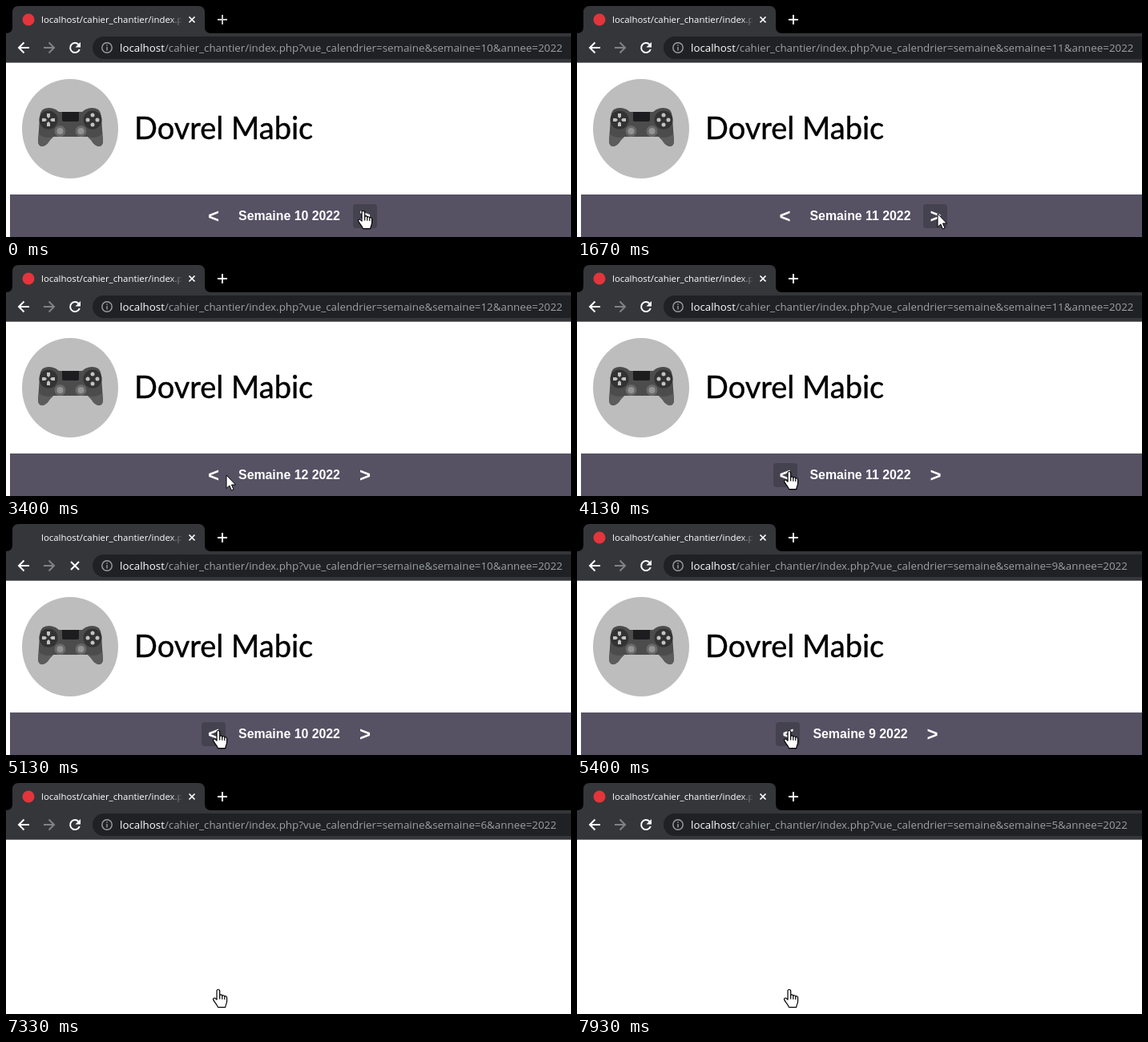
Animation of 705x288 px, one loop 8000 ms. Source, as an HTML page:

```html
<!DOCTYPE html>
<html lang="fr">
<head>
<meta charset="utf-8">
<title>Agenda</title>
<style>
  html, body { margin: 0; width: 100%; height: 100%; overflow: hidden; background: #fff; }
  #stage { position: relative; width: 705px; height: 288px; overflow: hidden; background: #fff; }
  svg { position: absolute; left: 0; top: 0; }
  .ui { font-family: "Open Sans", "Noto Sans", sans-serif; }
  .name { font: 38px Lato, sans-serif; stroke: #000; stroke-width: .4; stroke-linejoin: round; }
  #bar { position: absolute; left: 5px; top: 235px; width: 700px; height: 53px; background: #565264; }
  #nav {
    position: absolute; left: 0; top: 12px; width: 697px; height: 30px;
    display: flex; justify-content: center; gap: 16px;
    color: #fff; font: bold 15.85px/30px "Liberation Sans", Arial, sans-serif; white-space: nowrap;
  }
  #nav b { width: 30px; border-radius: 4px; text-align: center; font-size: 24px; }
  #nav b.on { background: #45424f; }
</style>
</head>
<body>
<div id="stage">
  <div id="page">
    <svg width="705" height="288">
      <ellipse cx="80" cy="153" rx="60" ry="62" fill="#bdbdbd"/>
      <path d="M46 129Q53 125 62 129L66 132H95L99 129Q108 125 115 129Q118 131 119 139L121 168Q121 175 116 175Q111 175 106 167L102 163H59L55 167Q50 175 45 175Q40 175 40 168L42 139Q43 131 46 129Z" fill="#4c4c4c"/>
      <path d="M41 160L40 168Q40 175 45 175Q50 175 55 167L59 163Q49 166 41 160ZM120 160L121 168Q121 175 116 175Q111 175 106 167L102 163Q112 166 120 160Z" fill="#5c5c5c"/>
      <path d="M70 132H91V142Q91 144 89 144H72Q70 144 70 142Z" fill="#1d1d1f"/>
      <g fill="#333"><circle cx="53" cy="142" r="11.5"/><circle cx="108" cy="142" r="11.5"/></g>
      <g fill="#c2c2c2">
        <path d="M51 134h4v4l-2 2-2-2zM51 150h4v-4l-2-2-2 2zM45 140v4h4l2-2-2-2zM61 140v4h-4l-2-2 2-2z"/>
        <circle cx="108" cy="136" r="2.5"/><circle cx="108" cy="148" r="2.5"/>
        <circle cx="102" cy="142" r="2.5"/><circle cx="114" cy="142" r="2.5"/>
      </g>
      <g fill="#939393" stroke="#696969" stroke-width="3">
        <circle cx="67.5" cy="156" r="5.5"/><circle cx="93.5" cy="156" r="5.5"/>
      </g>
      <text class="name" x="160" y="166">Dovrel Mabic</text>
    </svg>
    <div id="bar"><div id="nav"><b id="prev">&lt;</b><span id="week"></span><b id="next">&gt;</b></div></div>
  </div>

  <svg class="ui" width="705" height="288">
    <defs>
      <linearGradient id="fade">
        <stop offset="0" stop-color="#35363a" stop-opacity="0"/>
        <stop offset="1" stop-color="#35363a"/>
      </linearGradient>
      <clipPath id="tab"><rect x="40" width="179" height="34"/></clipPath>
    </defs>
    <rect width="705" height="34"/>
    <path d="M0 34Q8 34 8 26V8Q8 0 16 0H240Q248 0 248 8V26Q248 34 256 34H705V70H0Z" fill="#35363a"/>
    <rect y="70" width="705" height="1" fill="#747578"/>
    <rect x="108" y="38" width="640" height="28" rx="14" fill="#202124"/>
    <circle id="icon" cx="28" cy="17" r="7.5" fill="#e3353b"/>
    <text x="44" y="21" font-size="11.4" fill="#fff" clip-path="url(#tab)">localhost/cahier_chantier/index.php</text>
    <rect x="205" y="4" width="15" height="26" fill="url(#fade)"/>
    <g fill="none" stroke="#fff" stroke-width="2">
      <path d="M228.5 13.5l7 7m0-7l-7 7" stroke-width="1.7"/>
      <path id="plus" d="M264 17h12M270 11v12"/>
      <path d="M29 52H16.5M22.500 45.5L16 52l6.5 6.5"/>
      <path d="M47 52H59.5M53.500 45.5L60 52l-6.5 6.5" stroke="#808286"/>
      <g id="reload">
        <path d="M90.5 48A6 6 0 1 0 91.8 54"/>
        <path d="M93 45v6.5H86.5Z" fill="#fff" stroke="none"/>
      </g>
      <path id="stop" d="M81 47l10 10m0-10l-10 10"/>
      <g stroke="#9aa0a6" stroke-width="1.4">
        <circle cx="126" cy="52" r="6.2"/><path d="M126 51v4.5M126 48.3v1.5"/>
      </g>
    </g>
    <text x="142" y="57" font-size="13.35" fill="#9aa0a6"><tspan fill="#fff">localhost</tspan><tspan id="path"></tspan></text>

    <g id="cursor" stroke="#000" stroke-linejoin="round" fill="#fff">
      <g id="hand" stroke-width="1.2">
        <path d="M-2 13V2.3C-2-.1 1.7-.1 1.7 2.3V8C1.7 6.4 4.8 6.5 4.8 8.7C4.8 7.2 7.8 7.4 7.8 9.5C7.8 8.2 10.6 8.4 10.6 10.7V15C10.6 18 9 19 8.7 22.7H-.5C-1 20-4 17.5-6.3 13.4C-7.2 11.3-4.8 10.3-3.5 11.7Z"/>
        <path d="M1.7 8v4.5M4.8 8.7v4M7.8 9.5v3.5" fill="none"/>
      </g>
      <path id="arrow" d="M0 0V16.5L3.8 13l2.6 6 2.6-1.1L6.5 12H11.5Z"/>
      <path id="beam" d="M-3.5-8H-1L0-7 1-8H3.5M0-7V7M-3.5 8H-1L0 7 1 8H3.5" fill="none" stroke="#fff"/>
    </g>
  </svg>
</div>

<script>
const LOOP = 8000, FPS = 15;
const $ = id => document.getElementById(id);
const show = (id, on) => { $(id).style.visibility = on ? "visible" : "hidden"; };

// One page load: spinner, new address, optional blank page, new page, hover back.
const load = (week, side, busy, url, blank, page, hover = page) => [
  [busy, { busy: true }],
  [url, { busy: false, url: week }],
  ...(blank ? [[blank, { blank: true }]] : []),
  [page, { blank: false, week, hover: "" }],
  [hover, { hover: side }]
];

const steps = [
  [0, { url: 10, week: 10, hover: "next", busy: false, blank: false, kind: "hand", plus: "#c6c7c9" }],
  [330, { plus: "#fff" }],
  ...load(11, "next", 470, 530, 0, 670, 800),
  [730, { kind: "arrow" }],
  [1740, { kind: "hand" }],
  ...load(12, "next", 1800, 1870, 1930, 2070),
  [2200, { kind: "arrow", hover: "" }],
  [3470, { kind: "hand", hover: "prev" }],
  ...load(11, "prev", 3730, 3800, 3870, 4070, 4130),
  ...load(10, "prev", 4400, 4470, 4530, 4670, 4730),
  ...load(9, "prev", 5130, 5200, 5270, 5400),
  ...load(8, "prev", 5870, 5930, 5930, 6130),
  ...load(7, "prev", 6530, 6600, 6670, 6870),
  ...load(6, "prev", 7200, 7270, 7330, 7530),
  ...load(5, "prev", 7800, 7870, 7930, Infinity)
];

// Pointer tip: time, x, y. It visits the week number in the address, then the left button.
const route = [
  [0, 446, 255], [70, 446, 256], [670, 446, 256], [730, 450, 259], [1670, 450, 259],
  [1740, 449, 258], [2130, 449, 258], [2530, 600, 54], [2670, 640, 54],
  [2870, 590, 56], [3330, 281, 263], [3400, 275, 262], [3470, 266, 260], [3530, 265, 257]
];
const ease = k => k * k * (3 - 2 * k);

function pointer(t) {
  const i = route.findIndex(p => p[0] > t);
  if (i < 0) return route[route.length - 1].slice(1);
  const [t0, x0, y0] = route[i - 1], [t1, x1, y1] = route[i];
  const k = ease((t - t0) / (t1 - t0));
  return [x0 + (x1 - x0) * k, y0 + (y1 - y0) * k].map(Math.round);
}

function draw(time) {
  const tick = Math.floor(time * FPS / 1000 + 0.1);
  const t = Math.round(tick * 100 / FPS) * 10;
  const s = {};
  for (const [at, change] of steps) if (at <= t) Object.assign(s, change);

  $("path").textContent =
    `/cahier_chantier/index.php?vue_calendrier=semaine&semaine=${s.url}&annee=2022`;
  $("week").textContent = `Semaine ${s.week} 2022`;
  $("page").style.display = s.blank ? "none" : "block";
  $("plus").style.stroke = s.plus;
  for (const id of ["prev", "next"]) $(id).className = s.hover === id ? "on" : "";
  show("icon", !s.busy);
  show("reload", !s.busy);
  show("stop", s.busy);

  const [x, y] = pointer(t);
  const kind = y > 38 && y < 66 ? "beam" : s.kind;
  for (const id of ["hand", "arrow", "beam"]) show(id, id === kind);
  $("cursor").setAttribute("transform", `translate(${x} ${y})`);
}

const start = performance.now();
function frame() {
  draw((performance.now() - start) % LOOP);
  requestAnimationFrame(frame);
}
draw(0);
requestAnimationFrame(frame);
</script>
</body>
</html>
```
